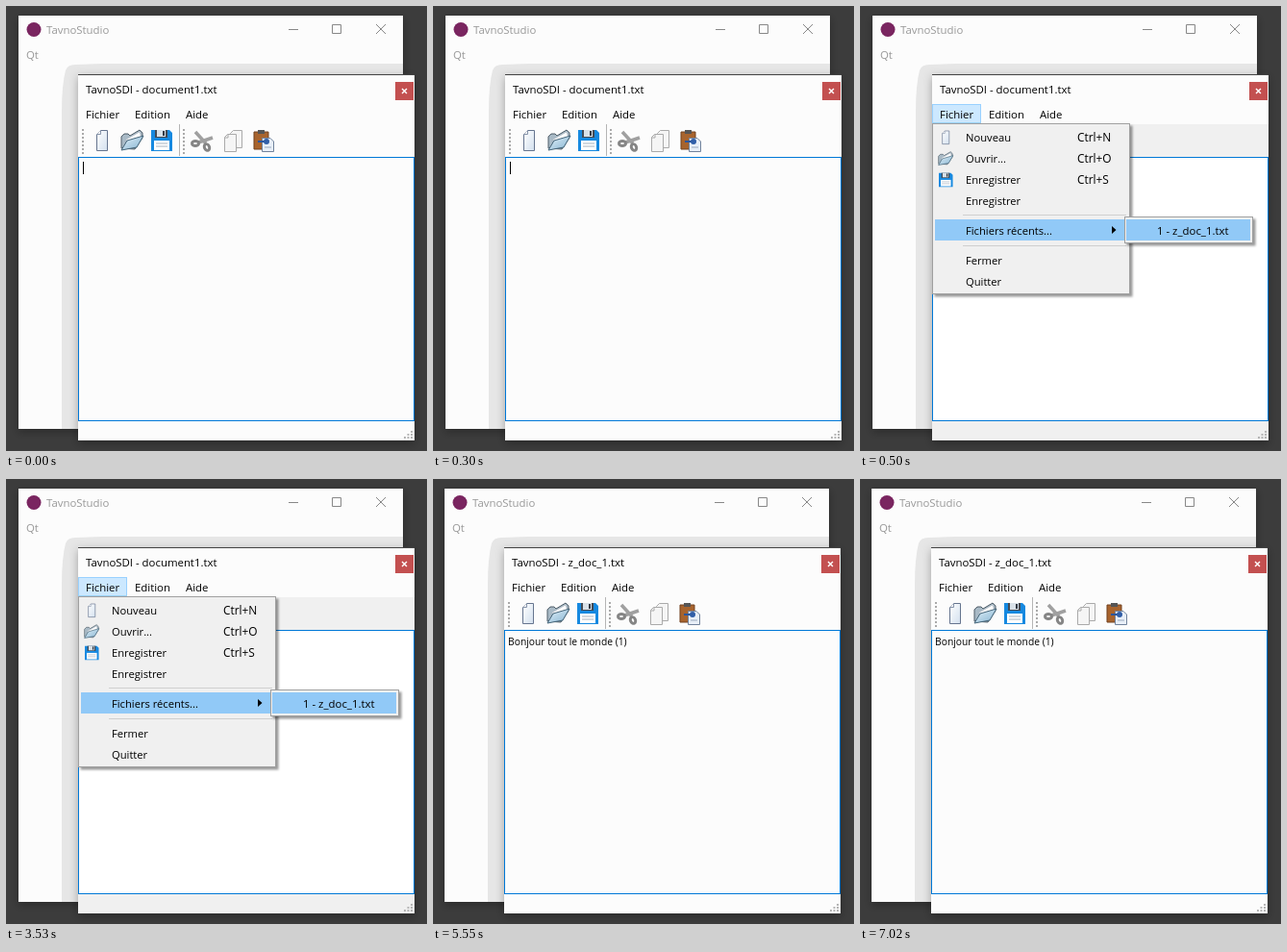
These frames come from a looping animation (438 by 463 pixels, 8 s). An HTML page:

```html
<!DOCTYPE html>
<html lang="fr">
<head>
<meta charset="utf-8">
<title>Fichiers récents</title>
<style>
  html, body { margin: 0; width: 100%; height: 100%; overflow: hidden; background: #3c3c3c; }
  svg { display: block; }
  text { font: 11.4px "Open Sans", "Noto Sans", sans-serif; fill: #000; white-space: pre; }
  rect { shape-rendering: crispEdges; }
  .dim text { fill: #999; }
  .labels text { font-size: 11.2px; }
  .keys text { font-size: 11.9px; }
  .small { font-size: 10.3px; }
  .line { fill: none; stroke: #888; }
  [hidden] { display: none; }
</style>
</head>
<body>
<svg width="438" height="463" viewBox="0 0 438 463">
  <defs>
    <filter id="windowShadow" x="-10%" y="-10%" width="120%" height="120%">
      <feDropShadow dx="0" dy="3" stdDeviation="5" flood-opacity=".3"/>
    </filter>
    <filter id="menuShadow" x="-10%" y="-20%" width="120%" height="150%">
      <feDropShadow dx="2.5" dy="2.5" stdDeviation="1" flood-opacity=".4"/>
    </filter>
    <linearGradient id="steel" x2="1" y2="1">
      <stop stop-color="#fff"/><stop offset="1" stop-color="#d3e0ee"/>
    </linearGradient>
    <linearGradient id="folderBlue" x2="1" y2="1">
      <stop stop-color="#e2f1f9"/><stop offset="1" stop-color="#86b4d2"/>
    </linearGradient>
    <g id="handle"><path d="M1 1V28" stroke="#aaa" stroke-width="2" stroke-dasharray="2 2"/></g>
    <g id="page">
      <path d="M2.5 5.5L6.5 1.5H13.5V22.5H2.5Z" fill="url(#steel)" stroke="#66758f"/>
      <path d="M2.5 5.5H6.5V1.5" fill="#fff" stroke="#8694aa"/>
    </g>
    <g id="folder" stroke-linejoin="round">
      <path d="M1 20V8L4 5H8L10 7L20 1L23 4V9L15 21Z" fill="#a9bac6" stroke="#4e5d68"/>
      <path d="M6 11L20 3L22 10L10 17Z" fill="#fff" stroke="#b5bdc4" stroke-width=".6"/>
      <path d="M1 22L7 12L24 7L17 19Z" fill="url(#folderBlue)" stroke="#456579"/>
    </g>
    <g id="disk">
      <path d="M0 1H19L22 4V23H0Z" fill="#1689e0"/>
      <path d="M4 1H17V9H4Z" fill="#444b55"/>
      <path d="M6 1H15V8H6Z" fill="#d9e1e8"/>
      <path d="M12 2H14V7H12Z" fill="#343b45"/>
      <path d="M3 12H19V22H3Z" fill="#fff"/>
      <path d="M5 15H17M5 18H17" stroke="#a5b2bf"/>
    </g>
    <g id="scissors" fill="none" stroke="#858585">
      <path d="M5 3L16 15M23 9L8 14" stroke="#a0a0a0" stroke-width="3.5"/>
      <ellipse cx="5" cy="15" rx="3.5" ry="2.5" stroke-width="3"/>
      <ellipse cx="17" cy="19" rx="2.5" ry="3.5" transform="rotate(-25 17 19)" stroke-width="3"/>
    </g>
    <g id="copies" fill="#f5f5f5" stroke="#aaa">
      <path d="M6.5 4.5L9.5 1.5H18.5V19.5H6.5Z"/>
      <path d="M.5 8.5L3.5 5.5H12.5V23.5H.5Z"/>
      <path d="M.5 9H4V5.5" fill="none"/>
    </g>
    <g id="clipboard">
      <path d="M1 3H16V21H1Z" fill="#a8642e" stroke="#70401e"/>
      <path d="M5 1H12V5H5Z" fill="#555"/>
      <path d="M9.5 9.5H18L21.5 13V23.5H9.5Z" fill="#e8eff8" stroke="#71839c"/>
      <path d="M5 13H14" stroke="#2b569d" stroke-width="2"/>
      <circle cx="14" cy="13" r="3" fill="#315fa8"/>
      <path d="M12 19H19" stroke="#9aa9bd"/>
    </g>
  </defs>

  <rect width="438" height="463" fill="#3c3c3c"/>
  <g id="scene">
    <g class="dim">
      <rect x="13" y="10" width="400" height="430" fill="#fcfcfc" filter="url(#windowShadow)"/>
      <path d="M58 440V110Q58 82 62 67Q64 61 72 61L100 60H413V440Z" fill="#e6e6e6"/>
      <circle cx="29" cy="24.5" r="7.5" fill="#7a2560"/>
      <text x="42" y="29">TavnoStudio</text>
      <text x="21" y="55">Qt</text>
      <path class="line" d="M294 24.5H304M339.5 19.5H348.5V28.5H339.5ZM385 19L395 29M395 19L385 29"/>
    </g>

    <rect x="75" y="71" width="350" height="381" fill="#fcfcfc" filter="url(#windowShadow)"/>
    <rect x="75" y="71" width="350" height="1" fill="#444"/>
    <rect id="toolbar" x="75" y="123" width="350" height="34"/>
    <rect id="status" x="75" y="432" width="350" height="20"/>
    <text id="title" x="83" y="91"></text>
    <rect x="405" y="79" width="19" height="19" fill="#c35050"/>
    <path d="M412 86L417 91M417 86L412 91" stroke="#fff" stroke-width="1.4"/>
    <rect id="fileHighlight" x="75.5" y="102.5" width="50" height="19" fill="#cce8ff" stroke="#99d1ff"/>
    <text x="83" y="117">Fichier</text>
    <text x="134" y="117">Edition</text>
    <text x="187" y="117">Aide</text>

    <g id="tools">
      <use href="#handle" x="79" y="127"/>
      <use href="#page" x="92" y="128"/>
      <use href="#folder" x="119" y="128"/>
      <use href="#disk" x="151" y="128"/>
      <path d="M180.5 123V156" stroke="#b5b5b5"/>
      <use href="#handle" x="184" y="127"/>
      <use href="#scissors" x="192" y="128"/>
      <use href="#copies" x="227" y="128"/>
      <use href="#clipboard" x="257" y="128"/>
    </g>

    <rect id="editor" x="75.5" y="157.5" width="349" height="274" stroke="#0078d7"/>
    <path d="M421 443h2M417.5 446h5.5M414 449h9" stroke="#b5b5b5" stroke-width="2" stroke-dasharray="2 1.5"/>
    <path id="caret" d="M80.5 162V175" stroke="#000"/>
    <text id="content" class="small" x="79" y="173">Bonjour tout le monde (1)</text>

    <g id="menu">
      <rect x="75.5" y="122.5" width="205" height="177" fill="#f0f0f0" stroke="#a0a0a0" filter="url(#menuShadow)"/>
      <rect x="78" y="222" width="200" height="22" fill="#91c9f7"/>
      <path d="M107 217.5H277M107 249.5H277" stroke="#cfcfcf"/>
      <use href="#page" transform="translate(84 129) scale(.65)"/>
      <use href="#folder" transform="translate(81 151) scale(.66)"/>
      <use href="#disk" transform="translate(82 173) scale(.66)"/>
      <g id="labels" class="labels"></g>
      <g id="keys" class="keys"></g>
      <path d="M262 229L266.5 233L262 237Z"/>
      <rect x="275.5" y="219.5" width="133" height="27" fill="#f0f0f0" stroke="#a0a0a0" filter="url(#menuShadow)"/>
      <rect x="277" y="222" width="129" height="22" fill="#91c9f7"/>
      <text x="309" y="238">1 - z_doc_1.txt</text>
    </g>
  </g>
</svg>
<script>
const el = id => document.getElementById(id);
const show = (id, visible) => el(id).toggleAttribute('hidden', !visible);
const addText = (parent, x, y, text) =>
  el(parent).insertAdjacentHTML('beforeend', `<text x="${x}" y="${y}">${text}</text>`);

const items = [
  ['Nouveau', 141, 'Ctrl+N'], ['Ouvrir...', 163, 'Ctrl+O'],
  ['Enregistrer', 185, 'Ctrl+S'], ['Enregistrer', 207],
  ['Fichiers récents...', 238], ['Fermer', 269], ['Quitter', 291]
];
for (const [label, y, key] of items) {
  addText('labels', 110, y, label);
  if (key) addText('keys', 226, y, key);
}

function setState(menuOpen, loaded) {
  const panel = menuOpen ? '#f0f0f0' : '#fcfcfc';
  el('toolbar').style.fill = el('status').style.fill = panel;
  el('editor').style.fill = menuOpen ? '#fff' : '#fcfcfc';
  el('title').textContent = `TavnoSDI - ${loaded ? 'z_doc_1' : 'document1'}.txt`;
  el('scene').setAttribute('transform', `translate(${loaded ? -1 : 0} 0)`);
  show('menu', menuOpen);
  show('fileHighlight', menuOpen);
  show('tools', !menuOpen);
  show('caret', !menuOpen && !loaded);
  show('content', loaded);
}

const start = performance.now();
function draw() {
  const time = Math.max(0, performance.now() - start) % 8000;
  setState(time >= 500 && time < 5550, time >= 5550);
  requestAnimationFrame(draw);
}
draw();
</script>
</body>
</html>
```
